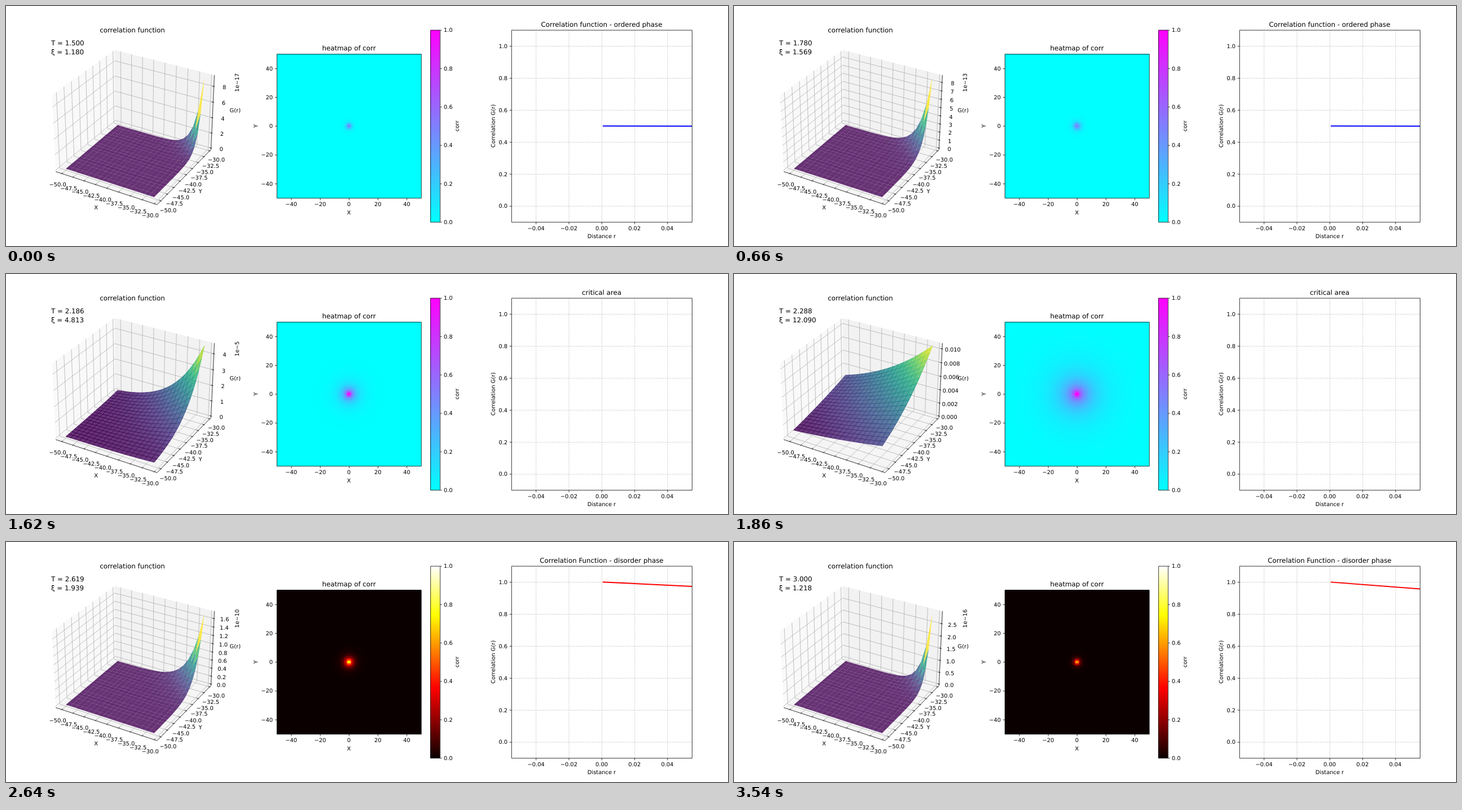
An HTML page with a canvas that plays this animation: 1280x427 px, repeating every 3.6 s.

```html
<!DOCTYPE html>
<html lang="en">
<head>
<meta charset="utf-8">
<title>Correlation function</title>
<style>
html, body { margin: 0; width: 100%; height: 100%; overflow: hidden; background: #fff; }
#heat { position: absolute; left: 480px; top: 85.4px; width: 256px; height: 256.2px; image-rendering: pixelated; }
svg { position: absolute; left: 0; top: 0; display: block; }
text { font-family: "DejaVu Sans", sans-serif; fill: #000; text-rendering: geometricPrecision; white-space: pre; }
.ink { stroke: #000; stroke-width: .79; fill: none; }
.grid { stroke: #b0b0b0; stroke-width: .79; fill: none; }
.dash { stroke: #b0b0b0; stroke-opacity: .7; stroke-width: .79; stroke-dasharray: 2.92 1.26; fill: none; }
</style>
</head>
<body>
<canvas id="heat" width="100" height="100"></canvas>
<svg width="1280" height="427" viewBox="0 0 1280 426.667" preserveAspectRatio="none">
  <defs>
    <linearGradient id="cool" x1="0" y1="1" x2="0" y2="0">
      <stop offset="0" stop-color="#0ff"/><stop offset="1" stop-color="#f0f"/>
    </linearGradient>
    <linearGradient id="hot" x1="0" y1="1" x2="0" y2="0">
      <stop offset="0" stop-color="#0b0000"/><stop offset=".365" stop-color="#f00"/>
      <stop offset=".746" stop-color="#ff0"/><stop offset="1" stop-color="#fff"/>
    </linearGradient>
    <clipPath id="plotClip"><rect x="896" y="42.67" width="320" height="341.33"/></clipPath>
  </defs>
  <g id="back"></g>
  <g id="zGrid"></g>
  <g id="surface" fill-opacity=".8" stroke-opacity=".8" stroke-linejoin="round"></g>
  <g id="zAxis"></g>
  <rect id="bar" x="752.2" y="42.8" width="17.07" height="341.4"/>
  <path id="curve" clip-path="url(#plotClip)" fill="none" stroke-width="1.98" stroke-linecap="square"/>
  <g id="front"></g>
  <g id="labels"></g>
</svg>
<script>
const FRAMES = 60, STEP = 60, TC = 2.269, CELLS = 100, SIDE = 20;
const TICK = 9.876, TITLE = 11.85;
const $ = id => document.getElementById(id);
const coord = i => -50 + 100 * i / (CELLS - 1);
const range = (a, b, step) => Array.from({ length: Math.round((b - a) / step) + 1 }, (_, i) => a + i * step);

// Markup helpers
const n2 = v => v.toFixed(2);
const minus = s => s.replace(/-/g, '\u2212');
const pathOf = pts => 'M' + pts.map(p => n2(p[0]) + ' ' + n2(p[1])).join('L');
const line = (cls, ...pts) => `<path class="${cls}" d="${pathOf(pts)}"/>`;
const label = (x, y, s, anchor = 'middle', size = TICK, turn = false) =>
  `<text x="${n2(x)}" y="${n2(y)}" font-size="${size}" text-anchor="${anchor}"` +
  (turn ? ` transform="rotate(-90 ${n2(x)} ${n2(y)})"` : '') + `>${s}</text>`;

// Flat lines sit on the pixel centres of an 1800 px wide figure
const PX = 1280 / 1800;
const snap = v => (Math.round(v / PX) + .5) * PX;
const flat = (cls, ...pts) => line(cls, ...pts.map(p => p.map(snap)));
const frame = (x0, y0, x1, y1) =>
  `<path class="ink" d="${pathOf([[x0, y0], [x1, y0], [x1, y1], [x0, y1]].map(p => p.map(snap)))}Z"/>`;

// Perspective view: 30 degrees up, turned by -60 degrees, eye at distance 10
const H = .5953, HZ = .4465;      // half size of the panes
const L = 1.143, LZ = .8572;      // size of the data limits
const PAD = .0811, PADZ = .0609;  // offset of tick labels
const FAR = .1764, FARZ = .1323;  // offset of axis names
const OUT = .0095, IN = .019;
const C = Math.sqrt(3) / 2;
function project(x, y, z) {
  const k = 1729.73 / (10 - (C / 2 * x - .75 * y + z / 2));
  return [228.32 + k * (C * x + y / 2), 209 - k * (-x / 4 + C / 2 * y + C * z)];
}
const boxX = v => (v + 40.404) / 21.111 * L;
const boxZ = f => (f - .5) * LZ;

// Colour maps
const VIRIDIS = ['440154', '472d7b', '3b528b', '2c728e', '21918c', '28ae80', '5ec962', 'addc30', 'fde725']
  .map(h => [0, 2, 4].map(i => parseInt(h.substr(i, 2), 16)));
const clamp = v => Math.min(1, Math.max(0, v));
function viridis(v) {
  const p = clamp(v) * 8, i = Math.min(7, Math.floor(p));
  return VIRIDIS[i].map((c, j) => Math.round(c + (VIRIDIS[i + 1][j] - c) * (p - i)));
}
const cool = v => [v, 1 - v, 1];
const hot = v => [clamp(.0416 + v * 2.6252), clamp((v - .365) / .381), clamp((v - .746) / .254)];

// Correlation laws below, near and above the critical temperature
const PHASES = [
  { title: 'Correlation function - ordered phase', map: cool, bar: 'cool', ink: '#00f', edge: 0,
    g: (r, xi) => .5 / Math.cosh(r / xi) },
  { title: 'critical area', map: cool, bar: 'cool', ink: 'none', edge: .99,
    g: (r, xi) => Math.pow(r, -.25) * Math.exp(-r / xi) },
  { title: 'Correlation Function - disorder phase', map: hot, bar: 'hot', ink: '#f00', edge: 0,
    g: (r, xi) => Math.exp(-r / xi) }
];

const plotX = v => 1056 + v * 320 / .11;
const plotY = v => 384 - (v + .1) * 341.33 / 1.2;
const heatX = v => 480 + (v + 50) * 2.56;
const heatY = v => 341.33 - (v + 50) * 2.56;

function drawStatic() {
  const pane = (fill, ...pts) => `<path fill="${fill}" d="${pathOf(pts.map(p => project(...p)))}Z"/>`;
  let back = pane('#f9f9f9', [-H, -H, -HZ], [-H, H, -HZ], [-H, H, HZ], [-H, -H, HZ]) +
    pane('#f2f2f2', [-H, H, -HZ], [H, H, -HZ], [H, H, HZ], [-H, H, HZ]) +
    pane('#f5f5f5', [-H, -H, -HZ], [H, -H, -HZ], [H, H, -HZ], [-H, H, -HZ]);
  const a = project(-H, -H, -HZ), c = project(H, -H, -HZ), b = project(H, H, -HZ), d = project(H, H, HZ);
  let ink = '', text = '';

  for (const v of range(-50, -30, 2.5)) {
    const p = boxX(v), name = minus(v.toFixed(1));
    back += line('grid', project(p, -H, -HZ), project(p, H, -HZ), project(p, H, HZ));
    back += line('grid', project(H, p, -HZ), project(-H, p, -HZ), project(-H, p, HZ));
    ink += line('ink', project(p, -H - OUT, -HZ), project(p, -H + IN, -HZ));
    ink += line('ink', project(H + OUT, p, -HZ), project(H - IN, p, -HZ));
    for (const q of [project(p, -H - PAD, -HZ - PADZ), project(H + PAD, p, -HZ - PADZ)])
      text += label(q[0], q[1] + 7.5, name);
  }
  ink += line('ink', a, c) + line('ink', c, b) + line('ink', b, d);
  const names = [['X', 0, -H - FAR, -HZ - FARZ], ['Y', H + FAR, 0, -HZ - FARZ], ['G(r)', H + FAR, H + FAR, 0]];
  for (const [s, ...p] of names) {
    const q = project(...p);
    text += label(q[0], q[1] + 3.6, s);
  }
  text += label(224, 47.4, 'correlation function', 'middle', TITLE);

  // Heat map frame
  for (const v of range(-40, 40, 20)) {
    const x = heatX(v), y = heatY(v), name = minus(String(v));
    ink += flat('ink', [x, 341.33], [x, 344.8]) + flat('ink', [480, y], [476.54, y]);
    text += label(x, 355.8, name) + label(473.1, y + 3.65, name, 'end');
  }
  ink += frame(480, 85.33, 736, 341.33);
  text += label(608, 79.4, 'heatmap of corr', 'middle', TITLE) +
    label(608, 370.4, 'X') + label(446, 213.3, 'Y', 'middle', TICK, true);

  // Colour bar
  for (const v of range(0, 1, .2)) {
    const y = 384 - v * 341.33;
    ink += flat('ink', [769.07, y], [772.53, y]);
    text += label(776, y + 3.65, v.toFixed(1), 'start');
  }
  ink += frame(752, 42.67, 769.07, 384);
  text += label(803.1, 213.3, 'corr', 'middle', TICK, true);

  // Line plot
  for (const i of range(-2, 2, 1)) {
    const x = plotX(i * .02);
    back += flat('dash', [x, 384], [x, 42.67]);
    ink += flat('ink', [x, 384], [x, 387.46]);
    text += label(x, 398.5, minus((i * .02).toFixed(2)));
  }
  for (const v of range(0, 1, .2)) {
    const y = plotY(v);
    back += flat('dash', [896, y], [1216, y]);
    ink += flat('ink', [896, y], [892.54, y]);
    text += label(889.1, y + 3.65, v.toFixed(1), 'end');
  }
  ink += frame(896, 42.67, 1216, 384);
  text += label(1056, 413.1, 'Distance r') + label(867.1, 213.3, 'Correlation G(r)', 'middle', TICK, true);

  $('back').innerHTML = back;
  $('front').innerHTML = ink + text;
}

const heat = $('heat').getContext('2d');
const pixels = heat.createImageData(CELLS, CELLS);
function drawHeat(phase, xi) {
  for (let j = 0, k = 0; j < CELLS; j++) {
    for (let i = 0; i < CELLS; i++) {
      const rgb = phase.map(clamp(phase.g(Math.hypot(coord(i), coord(j)), xi)));
      for (const c of rgb) pixels.data[k++] = 255 * c;
      pixels.data[k++] = 255;
    }
  }
  heat.putImageData(pixels, 0, 0);
}

function drawSurface(phase, xi, top, critical) {
  const z = [], at = [];
  for (let i = 0; i < SIDE; i++) {
    z.push([]); at.push([]);
    for (let j = 0; j < SIDE; j++) {
      z[i][j] = phase.g(Math.hypot(coord(i), coord(j)), xi) / top;
      at[i][j] = project(boxX(coord(i)), boxX(coord(j)), boxZ(z[i][j]));
    }
  }
  const mean = (i, j) => (z[i][j] + z[i + 1][j] + z[i][j + 1] + z[i + 1][j + 1]) / 4;
  const end = SIDE - 2;
  const lo = critical ? z[0][0] : mean(0, 0), hi = critical ? 1 : mean(end, end);
  let out = '';
  for (let i = 0; i <= end; i++) {
    for (let j = end; j >= 0; j--) {
      const d = pathOf([at[i][j], at[i + 1][j], at[i + 1][j + 1], at[i][j + 1]]);
      const rgb = `rgb(${viridis((mean(i, j) - lo) / (hi - lo))})`;
      out += `<path fill="${rgb}" stroke="${rgb}" d="${d}Z"/>`;
    }
  }
  $('surface').setAttribute('stroke-width', phase.edge);
  $('surface').innerHTML = out;
}

// At most nine intervals of a round size
function tickStep(top) {
  const raw = top / 9, e = Math.floor(Math.log10(raw));
  const m = [1, 2, 2.5, 5, 10].find(s => s * 10 ** e >= raw * (1 - 1e-9));
  return m === 10 ? [1, e + 1] : [m, e];
}

function drawHeights(top) {
  const [m, e] = tickStep(top), step = m * 10 ** e;
  const count = Math.floor(top / step + 1e-9);
  let order = Math.floor(Math.log10(count * step) + 1e-9);
  if (order > -5) order = 0;
  const digits = Math.max(0, order - e + (m === 2.5 ? 1 : 0));
  let grid = '', axis = '';
  for (let i = 0; i <= count; i++) {
    const h = boxZ(i * step / top), q = project(H + PAD, H + PAD, h);
    grid += line('grid', project(-H, -H, h), project(-H, H, h), project(H, H, h));
    axis += line('ink', project(H + OUT, H, h), project(H - IN, H, h));
    axis += label(q[0], q[1] + 7.5, (i * m * 10 ** (e - order)).toFixed(digits));
  }
  if (order) axis += label(412.8, 119.5, minus('1e' + order), 'end', TICK, true);
  $('zGrid').innerHTML = grid;
  $('zAxis').innerHTML = axis;
}

function drawFrame(k) {
  const T = 1.5 + 1.5 * k / (FRAMES - 1), gap = Math.abs(T - TC);
  const xi = Math.pow(gap, -.63);
  const critical = gap < .1;
  const phase = PHASES[critical ? 1 : T < TC ? 0 : 2];
  const top = phase.g(Math.hypot(coord(SIDE - 1), coord(SIDE - 1)), xi);

  drawHeights(top);
  drawSurface(phase, xi, top, critical);
  drawHeat(phase, xi);
  $('bar').setAttribute('fill', `url(#${phase.bar})`);
  $('curve').setAttribute('stroke', phase.ink);
  // The curve is sampled every .1, so only its first piece is in view
  $('curve').setAttribute('d', pathOf([.001, .1012].map(r => [plotX(r), plotY(phase.g(r, xi))])));
  $('labels').innerHTML =
    label(80, 69.6, 'T = ' + T.toFixed(3), 'start', TITLE) +
    label(80, 85.6, '\u03be = ' + xi.toFixed(3), 'start', TITLE) +
    label(1056, 36.74, phase.title, 'middle', TITLE);
}

let shown = -1;
const start = performance.now();
function tick() {
  const k = Math.floor((performance.now() - start) / STEP) % FRAMES;
  if (k !== shown) drawFrame(shown = k);
  requestAnimationFrame(tick);
}
drawStatic();
tick();
</script>
</body>
</html>
```
